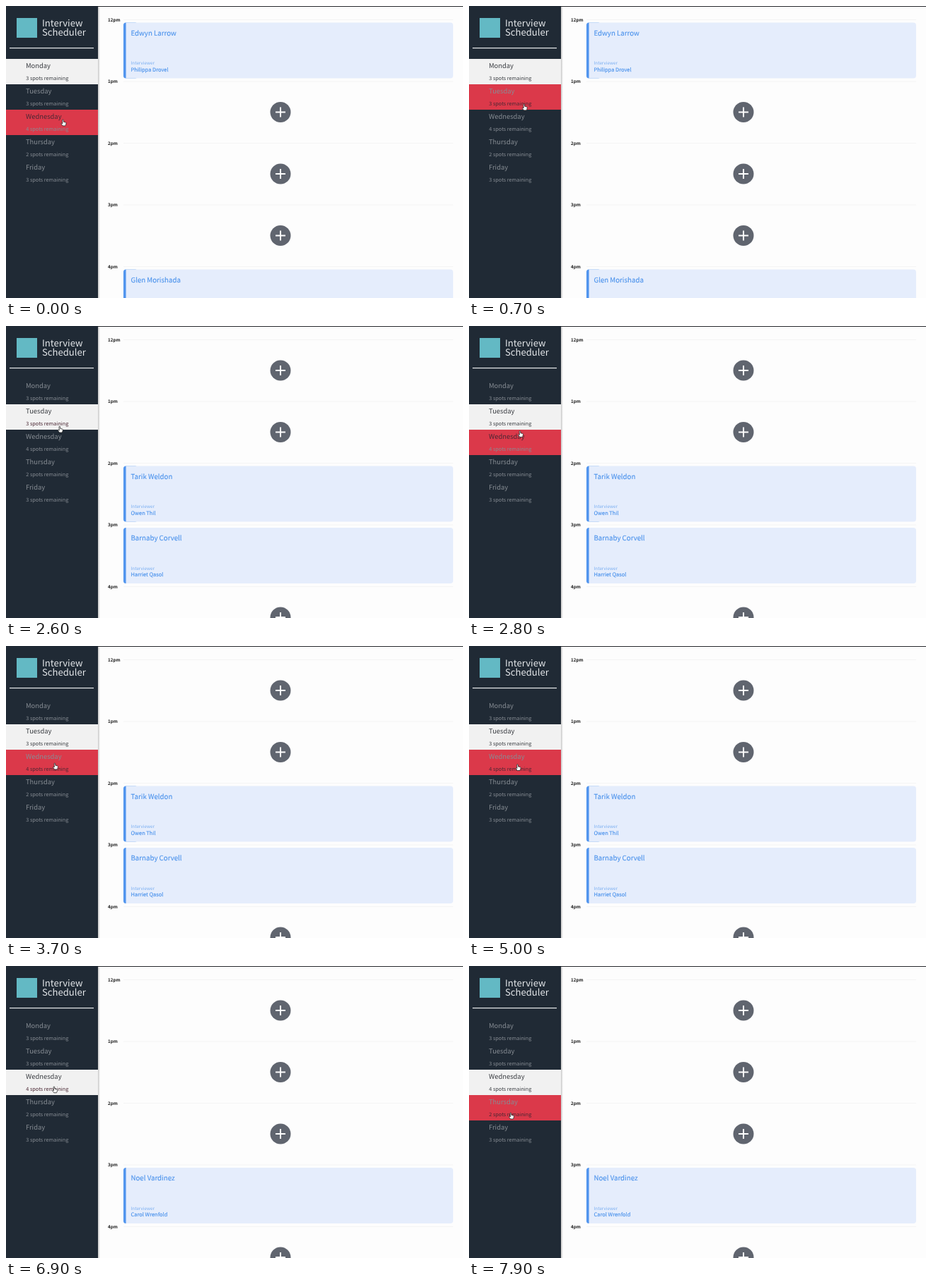
An HTML page that plays this animation: 646x414 px, repeating every 8 s.

```html
<!DOCTYPE html>
<html lang="en">
<head>
<meta charset="utf-8">
<title>Interview Scheduler</title>
<style>
  html, body { margin: 0; width: 100%; height: 100%; overflow: hidden; background: #fdfdfd; }
  svg { display: block; width: 100vw; height: 100vh; }
  text { font-family: "Noto Sans CJK JP", "Noto Sans CJK SC", "Noto Sans CJK", "Open Sans", sans-serif;
         text-rendering: geometricPrecision; white-space: pre; }
  .title { font-size: 13.1px; font-weight: 300; fill: #e4e7ea; }
  .day { font-size: 9.4px; font-weight: 300; }
  .spots { font-size: 7.28px; font-weight: 300; }
  .row rect { fill: none; }
  .row text { fill: #878d94; }
  .row.hover rect { fill: #db394a; }
  .row.hover text.over { fill: #4a2733; }
  .row.selected rect { fill: #f1f1f1; }
  .row.selected text { fill: #3a3d42; }
  .hour { font-size: 6.3px; font-weight: 700; fill: #1c1c1c; }
  .student { font-size: 9.7px; font-weight: 500; fill: #4c93ec; stroke: #4c93ec; stroke-width: .12px; }
  .label { font-size: 6.25px; font-weight: 300; fill: #78adf1; }
  .interviewer { font-size: 7.47px; font-weight: 500; fill: #4c93ec; stroke: #4c93ec; stroke-width: .15px; }
</style>
</head>
<body>
<svg id="stage" viewBox="0 0 646 414" preserveAspectRatio="none">
  <defs>
    <linearGradient id="edge">
      <stop offset="0" stop-color="#000" stop-opacity=".22"/>
      <stop offset="1" stop-color="#000" stop-opacity="0"/>
    </linearGradient>
  </defs>
  <rect width="646" height="414" fill="#fdfdfd"/>
  <g id="schedules"></g>
  <rect x="130" width="3" height="414" fill="url(#edge)"/>
  <rect x="130" width="516" height="1" fill="#25272b"/>
  <rect width="130" height="414" fill="#202a35"/>
  <rect x="15" y="17" width="29" height="28" fill="#63b9c4"/>
  <text class="title" x="51" y="29.3">Interview</text>
  <text class="title" x="51" y="42.3">Scheduler</text>
  <rect x="5" y="59" width="119" height="1.2" fill="#e8eaec"/>
  <g id="days"></g>
  <g id="cursor">
    <path d="M-1.9-3.6c0-1.1 1.5-1.1 1.6 0l.2 2.4 2.7.6c.8.2 1 .6.9 1.4l-.5 2.3-.6 1.3h-3.7l-2-2.7c-.5-.8.4-1.4 1.1-.8l.6.6z"
          fill="#fff" stroke="#1b1b1b" stroke-width=".75" stroke-linejoin="round"/>
  </g>
</svg>
<script>
const LOOP = 8000, STEP = 100;
const ROW_TOP = 75, ROW_HEIGHT = 36;
const SLOT_TOP = 19.5, SLOT_HEIGHT = 87.5;

const days = [["Monday", 3], ["Tuesday", 3], ["Wednesday", 4], ["Thursday", 2], ["Friday", 3]];
const hours = ["12pm", "1pm", "2pm", "3pm", "4pm"];

// Bookings per day, keyed by slot index
const bookings = [
  { 0: ["Edwyn Larrow", "Philippa Drovel"], 4: ["Glen Morishada", ""] },
  { 2: ["Tarik Weldon", "Owen Thil"], 3: ["Barnaby Corvell", "Harriet Qasol"] },
  { 3: ["Noel Vardinez", "Carol Wrenfold"] }
];

const selections = [[0, 0], [1200, 1], [5400, 2]]; // time, day
const cursorPath = [ // time, x, y
  [0, 81.5, 165.5], [200, 81.5, 165.5], [400, 80.5, 157], [600, 79.2, 145.5], [700, 78.8, 143.5],
  [2500, 78.8, 143.5], [2800, 73, 153], [3400, 70.3, 169], [4000, 69.6, 172],
  [6800, 69.6, 172.5], [7100, 68, 181], [7500, 62, 205], [7700, 60.2, 211], [7900, 60, 212.5]
];

const $ = id => document.getElementById(id);
const text = (cls, x, y, s) => `<text class="${cls}" x="${x}" y="${y}">${s}</text>`;

const card = (y, [student, interviewer]) => `
  <rect x="166" y="${y}" width="20" height="79" rx="3.5" fill="#5295ee"/>
  <path d="M169.6 ${y}h458.4a4 4 0 0 1 4 4v71a4 4 0 0 1-4 4h-458.4z" fill="#e5edfc"/>
  ${text("student", 176.5, y + 18.4, student)}
  ${text("label", 176.5, y + 59.9, "Interviewer")}
  ${text("interviewer", 176.5, y + 69, interviewer)}`;

const addButton = y => `
  <circle cx="388" cy="${y}" r="14.5" fill="#60656f"/>
  <path d="M381 ${y}h14M388 ${y - 7}v14" stroke="#fff" stroke-width="2"/>`;

const slot = (hour, i, booked) => {
  const y = SLOT_TOP + i * SLOT_HEIGHT;
  return text("hour", 144, y + 2.4, hour)
    + `<path d="M166 ${y}H632" stroke="#f4f4f4"/>`
    + (booked ? card(y + 4, booked) : addButton(y + 43.5));
};

$("schedules").innerHTML = bookings
  .map(day => `<g>${hours.map((hour, i) => slot(hour, i, day[i])).join("")}</g>`).join("");

$("days").innerHTML = days.map(([name, spots], i) => {
  const y = ROW_TOP + i * ROW_HEIGHT;
  return `<g class="row"><rect y="${y}" width="130" height="${ROW_HEIGHT}"/>`
    + text("day", 28, y + 13, name)
    + text("spots", 28.3, y + 29.8, `${spots} spots remaining`) + "</g>";
}).join("");

const schedules = [...$("schedules").children];
const rows = [...$("days").children];

function cursorAt(t) {
  const next = cursorPath.findIndex(p => p[0] > t);
  if (next < 0) return cursorPath.at(-1).slice(1);
  const [t0, x0, y0] = cursorPath[next - 1], [t1, x1, y1] = cursorPath[next];
  const k = (t - t0) / (t1 - t0);
  return [x0 + (x1 - x0) * k, y0 + (y1 - y0) * k];
}

function render(t) {
  const selected = selections.filter(s => s[0] <= t).pop()[1];
  const [x, y] = cursorAt(t);
  const offset = y - 4 - ROW_TOP;
  const hovered = Math.floor(offset / ROW_HEIGHT);
  const overName = offset % ROW_HEIGHT < 18;

  schedules.forEach((g, i) => g.style.display = i === selected ? "" : "none");
  rows.forEach((row, i) => {
    row.classList.toggle("selected", i === selected);
    row.classList.toggle("hover", i === hovered);
    row.querySelector(".day").classList.toggle("over", overName);
    row.querySelector(".spots").classList.toggle("over", !overName);
  });
  $("cursor").setAttribute("transform", `translate(${x} ${y})`);
}

const start = performance.now();
function tick() {
  const t = (performance.now() - start) % LOOP;
  render(Math.floor(t / STEP) * STEP);
  requestAnimationFrame(tick);
}
tick();
</script>
</body>
</html>
```
